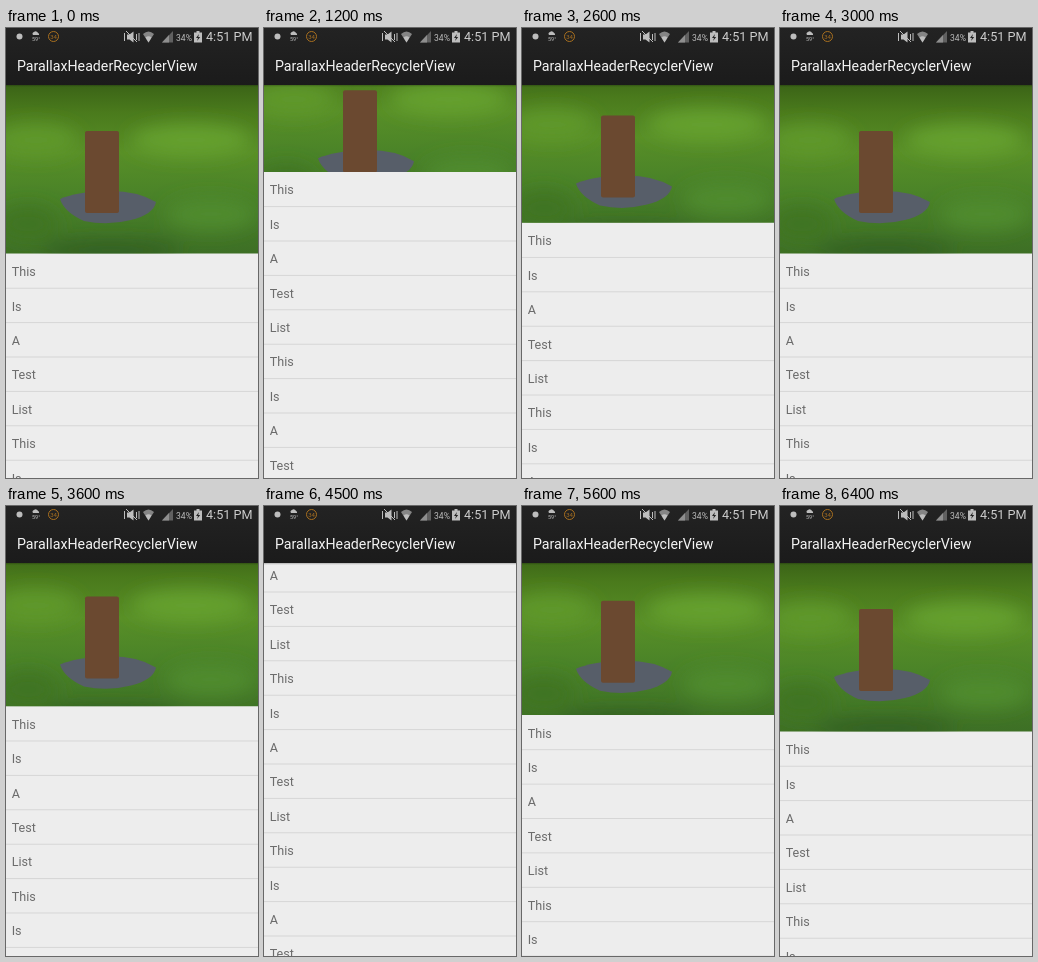
An HTML page that plays this animation: 252 px wide and 450 px high, repeating every 6.5 s.

```html
<!DOCTYPE html>
<html lang="en">
<head>
<meta charset="utf-8">
<title>Parallax header list</title>
<style>
  html, body { margin: 0; width: 100%; height: 100%; overflow: hidden; background: #ededed; }
  svg { display: block; width: 252px; height: 450px; font-family: Roboto, sans-serif; }
  #rows text { font-size: 12.6px; fill: #6c6c6c; }
</style>
</head>
<body>
<svg viewBox="0 0 252 450">
  <defs>
    <linearGradient id="grass" x2="0" y2="1">
      <stop offset="0" stop-color="#3b6417"/>
      <stop offset=".16" stop-color="#4a7a1c"/>
      <stop offset=".4" stop-color="#588f27"/>
      <stop offset=".65" stop-color="#4a8328"/>
      <stop offset="1" stop-color="#3d6f25"/>
    </linearGradient>
    <linearGradient id="bar" x2="0" y2="1">
      <stop offset="0" stop-color="#232323"/>
      <stop offset="1" stop-color="#1b1b1b"/>
    </linearGradient>
    <linearGradient id="shade" x2="0" y2="1">
      <stop offset="0" stop-opacity=".25"/>
      <stop offset="1" stop-opacity="0"/>
    </linearGradient>
    <filter id="soft" x="-50%" y="-50%" width="200%" height="200%"><feGaussianBlur stdDeviation="9"/></filter>
    <clipPath id="window"><rect id="opening" y="57" width="252" height="168.5"/></clipPath>
  </defs>

  <rect width="252" height="450" fill="#ededed"/>

  <g clip-path="url(#window)">
    <g id="photo">
      <rect y="57" width="252" height="169" fill="url(#grass)"/>
      <g filter="url(#soft)">
        <ellipse cx="185" cy="112" rx="60" ry="16" fill="#65a02f"/>
        <ellipse cx="30" cy="112" rx="42" ry="16" fill="#5f982b"/>
        <ellipse cx="22" cy="196" rx="30" ry="18" fill="#417523"/>
        <ellipse cx="205" cy="186" rx="45" ry="16" fill="#508b2f"/>
        <ellipse cx="105" cy="222" rx="70" ry="9" fill="#335f20"/>
      </g>
      <path d="M54 171Q70 164 100 163T150 174Q148 186 125 192T78 193Q58 184 54 171Z" fill="#575e69"/>
      <rect x="79" y="103" width="34" height="82" rx="2" fill="#6b4930"/>
    </g>
  </g>

  <g id="rows"></g>

  <rect y="57" width="252" height="2" fill="url(#shade)"/>
  <rect width="252" height="57" fill="url(#bar)"/>
  <text x="11" y="43" font-size="14.2" fill="#f4f4f4">ParallaxHeaderRecyclerView</text>

  <g fill="#bdbdbd">
    <circle cx="13.5" cy="8.5" r="3"/>
    <path d="M27 7a2 2 0 0 1 1-3 2.5 2.5 0 0 1 4 1 1.5 1.5 0 0 1 1 2z"/>
    <text x="26" y="13" font-size="5.5">59°</text>
    <path d="M121 6.5h2.5l4-3v11l-4-3H121z"/>
    <path d="M118.5 5v8M133 5v8M130.5 6v6M120 3l11 11" fill="none" stroke="#bdbdbd"/>
    <path d="M137 6Q142.5 1 148 6L142.5 14.5z" fill="#858585"/>
    <path d="M139.5 9.5Q142.500 7 145.5 9.5L142.5 14.5z"/>
    <path d="M156 14.5L167 3v11.5z" fill="#606060"/>
    <path d="M156 14.5L163 7v7.5z" fill="#8e8e8e"/>
    <text x="170" y="12.5" font-size="8.6">34%</text>
    <path d="M190.5 3h3v1.5h2.5v10h-8v-10h2.5z"/>
    <path d="M193 6l-3 4h2l-1 3 3.2-4h-2z" fill="#222"/>
    <text x="200" y="13.4" font-size="12.65" fill="#cdcdcd">4:51 PM</text>
  </g>
  <circle cx="47.5" cy="8.5" r="5" fill="none" stroke="#a9701f"/>
  <text x="47.5" y="10.7" font-size="6" fill="#a9701f" text-anchor="middle">34</text>
</svg>

<script>
const LOOP = 6500, STEP = 100, ROW = 34.4, HEADER_END = 225.5;
const words = ['This', 'Is', 'A', 'Test', 'List'];
// [time in ms, scroll distance in px]
const keys = [
  [0, 0], [700, 0], [1200, 81.6], [1800, 183], [2000, 197], [2800, 0],
  [3400, 0], [4000, 135], [4500, 243], [4700, 252], [5600, 16.5], [5800, 0], [LOOP, 0]
];
const byId = id => document.getElementById(id);
const rows = byId('rows'), photo = byId('photo'), opening = byId('opening');

rows.innerHTML = Array.from({ length: 16 }, (_, i) => {
  const y = HEADER_END + i * ROW;
  return `<text x="5.7" y="${y + 22.6}">${words[i % 5]}</text>
    <rect y="${y + ROW - 0.2}" width="252" height="1" fill="#d6d6d6"/>`;
}).join('');

const slope = (a, b) => (b[1] - a[1]) / (b[0] - a[0]);

// Harmonic mean of neighbouring slopes keeps the curve from overshooting.
function tangent(i) {
  if (i === 0 || i === keys.length - 1) return 0;
  const a = slope(keys[i - 1], keys[i]), b = slope(keys[i], keys[i + 1]);
  return a * b > 0 ? 2 * a * b / (a + b) : 0;
}

function scrollAt(time) {
  const i = keys.findIndex(key => key[0] > time) - 1;
  const [t0, y0] = keys[i], [t1, y1] = keys[i + 1];
  const span = t1 - t0, u = (time - t0) / span, v = 1 - u;
  return v * v * ((1 + 2 * u) * y0 + u * span * tangent(i))
       + u * u * ((3 - 2 * u) * y1 - v * span * tangent(i + 1));
}

function draw(now) {
  const scroll = scrollAt(Math.floor(now % LOOP / STEP) * STEP);
  rows.setAttribute('transform', `translate(0 ${-scroll})`);
  photo.setAttribute('transform', `translate(0 ${-scroll / 2})`);
  opening.setAttribute('height', Math.max(0, HEADER_END - 57 - scroll));
  requestAnimationFrame(draw);
}
draw(performance.now());
</script>
</body>
</html>
```
